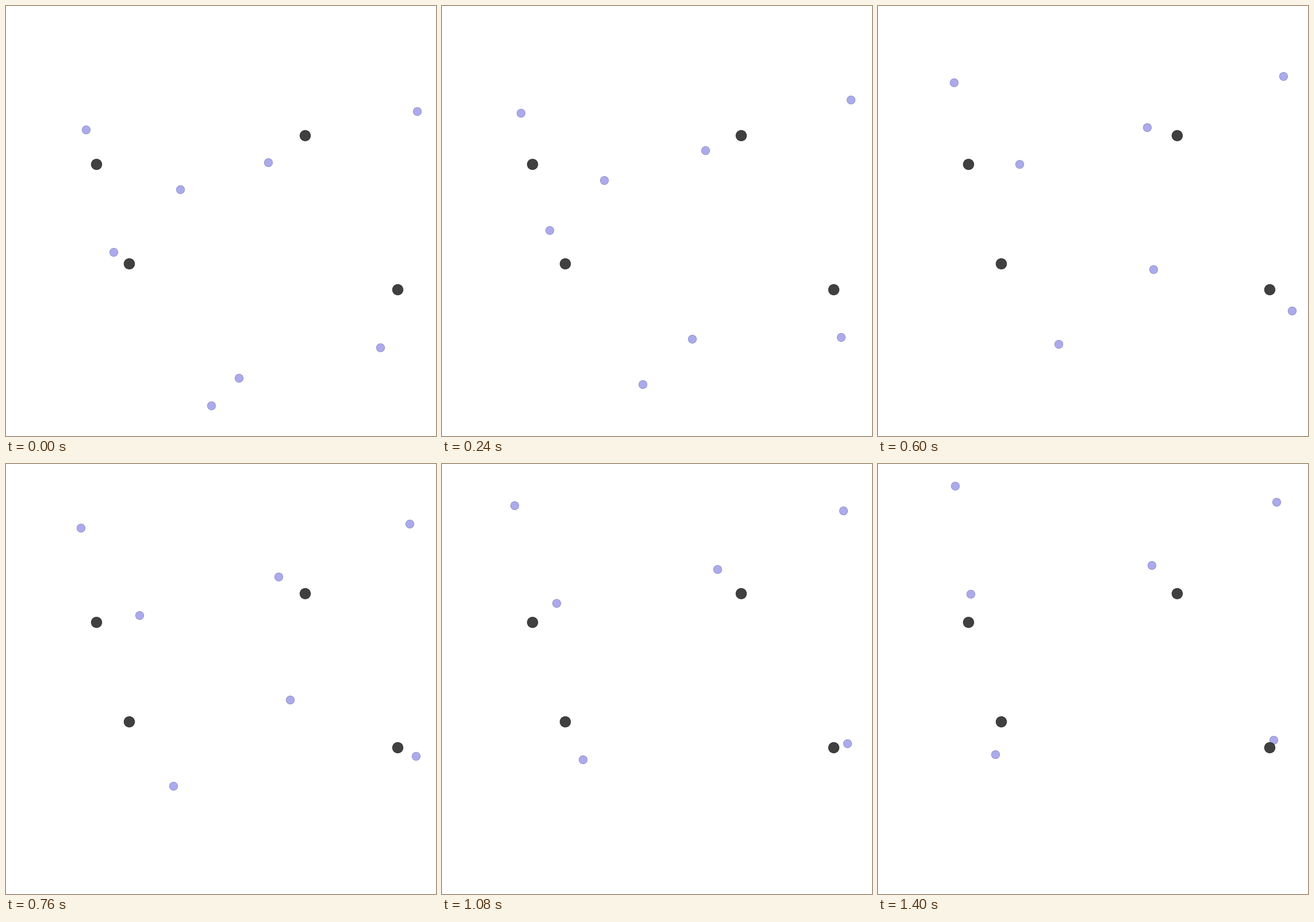
A matplotlib script that plays this animation: 748 by 748 pixels, repeating every 1.44 s.

```python
import numpy as np
import matplotlib.pyplot as plt
from matplotlib.animation import FuncAnimation

SIZE, DPI = 748, 88
FRAMES, STEP = 36, 40

KEY_TIMES = np.array([0, 440, 760, 1080, 1400], float)
ANCHORS = [(157.2, 274.7), (520.5, 225), (214, 448), (681.2, 492.7)]

# Key points of each path, shared by all dots in time.
PATHS = [
    [(139.2, 215), (133.7, 156), (129.7, 111.2), (125.6, 72.2), (134, 37.7)],
    [(715.2, 183.2), (707.2, 140.2), (702.2, 104.2), (697.7, 81.2), (692.7, 65.7)],
    [(456.2, 272.3), (462.7, 228.3), (474.2, 195.7), (479.4, 183.2), (475.9, 176)],
    [(303.2, 318.5), (260.7, 286.7), (231.7, 263), (199.3, 241.7), (161.5, 226)],
    [(357.4, 695.1), (333.4, 618.2), (291.3, 559.5), (245.5, 513.5), (204.5, 505.3)],
    [(651.2, 593.5), (720, 553.2), (713.3, 507.9), (705.1, 485.7), (688.2, 479.7)],
    [(187.4, 428.4), (186.4, 349)],
    [(405.3, 646.5), (462.7, 509.1), (493.7, 409.5), (521, 328)],
]
VANISH = {6: 360, 7: 920}


def along(path, t):
    """Place on a smooth curve through the key points, starting at half speed."""
    times, points = KEY_TIMES[:len(path)], np.array(path)
    speeds = np.gradient(points, times, axis=0, edge_order=min(2, len(path) - 1))
    speeds[0] /= 2
    i = min(np.searchsorted(times, t, side="right"), len(path) - 1) - 1
    span = times[i + 1] - times[i]
    u = (t - times[i]) / span
    ease = u * u * (3 - 2 * u)
    bend = u * (1 - u) * ((1 - u) * speeds[i] - u * speeds[i + 1])
    return points[i] + ease * (points[i + 1] - points[i]) + span * bend


def positions(t):
    return [along(path, t) for n, path in enumerate(PATHS)
            if t < VANISH.get(n, np.inf)]


def dots(points, diameter, face, edge, **style):
    pt = 72 / DPI
    return ax.scatter(*zip(*points), s=(diameter * pt) ** 2, c=face,
                      edgecolors=edge, linewidths=pt, **style)


fig = plt.figure(figsize=(SIZE / DPI, SIZE / DPI), dpi=DPI, facecolor="white")
ax = fig.add_axes([0, 0, 1, 1])
ax.set(xlim=(0, SIZE), ylim=(SIZE, 0))
ax.axis("off")

movers = dots(positions(0), 14.2, "#ababeb", "#9292d0", zorder=2)
dots(ANCHORS, 18.4, "#404040", "#333333", zorder=3)


def draw(frame):
    movers.set_offsets(positions(frame * STEP))
    return [movers]


anim = FuncAnimation(fig, draw, frames=FRAMES, interval=STEP, repeat=True,
                     repeat_delay=0, blit=False)
plt.show()
```
